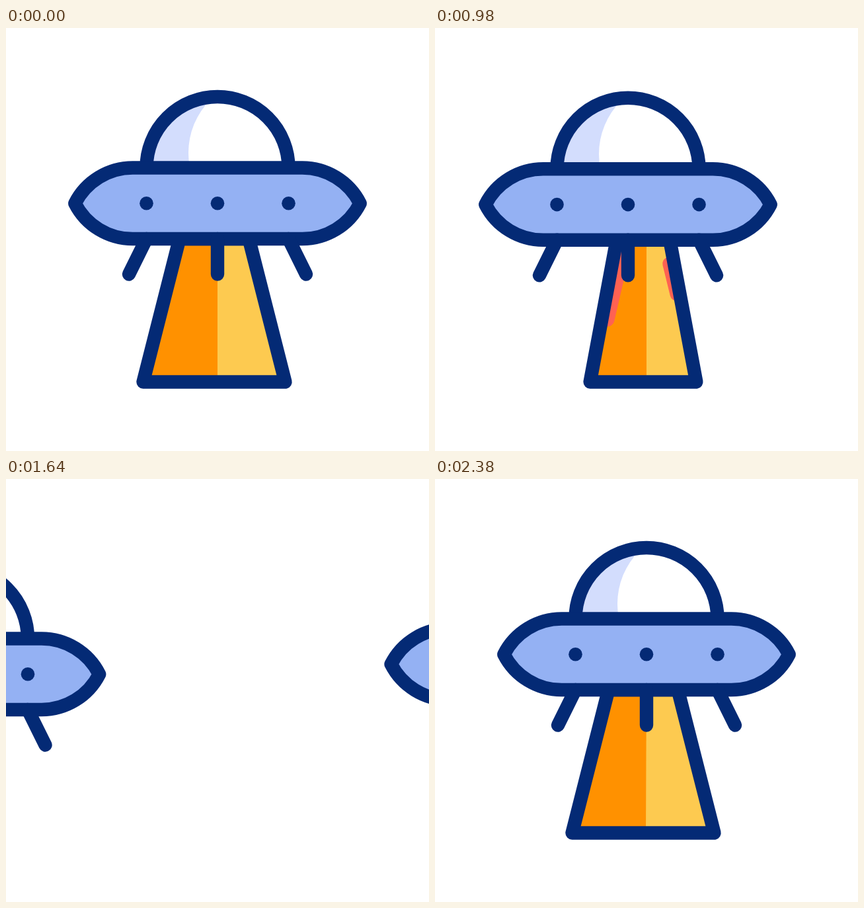
Recreate the animation shown at these times as an HTML page with a canvas. Size 640 by 640 pixels, loop 2.4 s.

```html
<!DOCTYPE html>
<html lang="en">
<head>
<meta charset="utf-8">
<title>Flying saucer</title>
<style>
  html, body { margin: 0; width: 100%; height: 100%; overflow: hidden; background: #fff; }
  canvas { display: block; width: 100vw; height: 100vh; }
</style>
</head>
<body>
<canvas id="stage" width="640" height="640"></canvas>
<script>
const ctx = document.getElementById('stage').getContext('2d');
const LOOP = 2400;
const LEAVE = [1231, 1766], RETURN = [1330, 2205];
const NAVY = '#042a75', BLUE = '#94b1f3', SHADE = '#d3ddfd';
const ORANGE = '#ff9100', YELLOW = '#fdca50', RED = '#ff6252';
const LINE = 20.4;

const HULL = new Path2D('M104.3 265.3A98 98 0 0 1 192 211.5H448A98 98 0 0 1 535.7 265.3' +
  'A98 98 0 0 1 448 319H192A98 98 0 0 1 104.3 265.3Z');
const DOME = new Path2D('M212.5 211.5A107.5 107.5 0 0 1 427.5 211.5');
const LEGS = new Path2D('M212.5 319L186 372.5M320 319V372.5M427.5 319L454 372.5');

const SWAY_X = [[0, 0], [245, 21], [960, -28.5], [1225, 0]];
const SWAY_Y = [[0, 0], [575, 36], [1135, -6], [1230, 0]];

// Each streak rises along a line from its low point to its high point.
const STREAKS = [
  { from: [244.5, 514], to: [294, 300], head: [555, 960], tail: [840, 1200] },
  { from: [279, 530], to: [302, 300], head: [150, 540], tail: [350, 740] },
  { from: [320.3, 540], to: [322.5, 300], head: [400, 760], tail: [620, 980] },
  { from: [397, 530], to: [340.5, 300], head: [408, 1168], tail: [543, 1335], linear: true }
];

const mix = (a, b, k) => a + (b - a) * k;
const ramp = (t, a, b) => Math.min(1, Math.max(0, (t - a) / (b - a)));
const ease = (t, a, b) => { const s = ramp(t, a, b); return s * s * (3 - 2 * s); };

function follow(t, keys) {
  let value = keys[0][1];
  for (let i = 1; i < keys.length; i++) {
    value += (keys[i][1] - keys[i - 1][1]) * ease(t, keys[i - 1][0], keys[i][0]);
  }
  return value;
}

// Arc between home (0) and the far end of the flight (1).
function flight(d, side, sag) {
  return { x: 555 * d * side, y: sag * d * (1 - d) * (2.1 - d) };
}

function at(x, y, draw) {
  ctx.save();
  ctx.translate(x, y);
  draw();
  ctx.restore();
}

function outline(path, color = NAVY) {
  ctx.strokeStyle = color;
  ctx.stroke(path);
}

function drawStreaks(t) {
  for (const { from, to, head, tail, linear } of STREAKS) {
    const move = linear ? ramp : ease;
    const h = move(t, ...head), l = move(t, ...tail);
    if (h <= l) continue;
    const path = new Path2D();
    path.moveTo(mix(from[0], to[0], l), mix(from[1], to[1], l));
    path.lineTo(mix(from[0], to[0], h), mix(from[1], to[1], h));
    outline(path, RED);
  }
}

function drawBeam(t, closed, retract, splitFoot) {
  const top = mix(52.5, 4.5, closed), foot = mix(107.5, 4.5, closed);
  const bottom = 535.5 - retract;
  const path = new Path2D();
  path.moveTo(315 - top, 319);
  path.lineTo(315 + top, 319);
  path.lineTo(315 + foot, bottom);
  path.lineTo(315 - foot, bottom);
  path.closePath();

  ctx.save();
  ctx.clip(path);
  ctx.fillStyle = YELLOW;
  ctx.fillRect(200, 300, 240, 250);
  ctx.fillStyle = ORANGE;
  ctx.beginPath();
  ctx.moveTo(190, 300);
  ctx.lineTo(320, 300);
  ctx.lineTo(splitFoot, 540);
  ctx.lineTo(190, 540);
  ctx.fill();
  drawStreaks(t);
  ctx.restore();
  outline(path);
}

function disc(x, y, r, color) {
  ctx.fillStyle = color;
  ctx.beginPath();
  ctx.arc(x, y, r, 0, Math.PI * 2);
  ctx.fill();
}

function drawShip() {
  ctx.save();
  ctx.clip(DOME);
  ctx.fillStyle = SHADE;
  ctx.fillRect(200, 90, 240, 130);
  disc(390, 189, 114, '#fff');
  ctx.restore();
  outline(DOME);
  ctx.fillStyle = BLUE;
  ctx.fill(HULL);
  outline(HULL);
  outline(LEGS);
  for (const x of [212.5, 320, 427.5]) disc(x, 265.3, 10.3, NAVY);
}

function render(t) {
  ctx.fillStyle = '#fff';
  ctx.fillRect(0, 0, 640, 640);
  ctx.lineWidth = LINE;
  ctx.lineCap = ctx.lineJoin = 'round';

  if (t < LEAVE[1]) {
    const out = flight(ease(t, ...LEAVE), 1, 101);
    at(out.x, out.y, () => drawBeam(t, ease(t, 870, 1200), 216 * ease(t, 1242, 1592), 320));
    at(out.x + follow(t, SWAY_X), out.y + follow(t, SWAY_Y), drawShip);
  }
  if (t > RETURN[0]) {
    const back = flight(1 - ease(t, ...RETURN), -1, 105);
    at(back.x, back.y, () => {
      drawBeam(t, 1 - ease(t, 1950, 2330), 216 * (1 - ease(t, 1700, 2010)), 319);
      drawShip();
    });
  }
}

function tick() {
  render(performance.now() % LOOP);
  requestAnimationFrame(tick);
}
tick();
</script>
</body>
</html>
```
